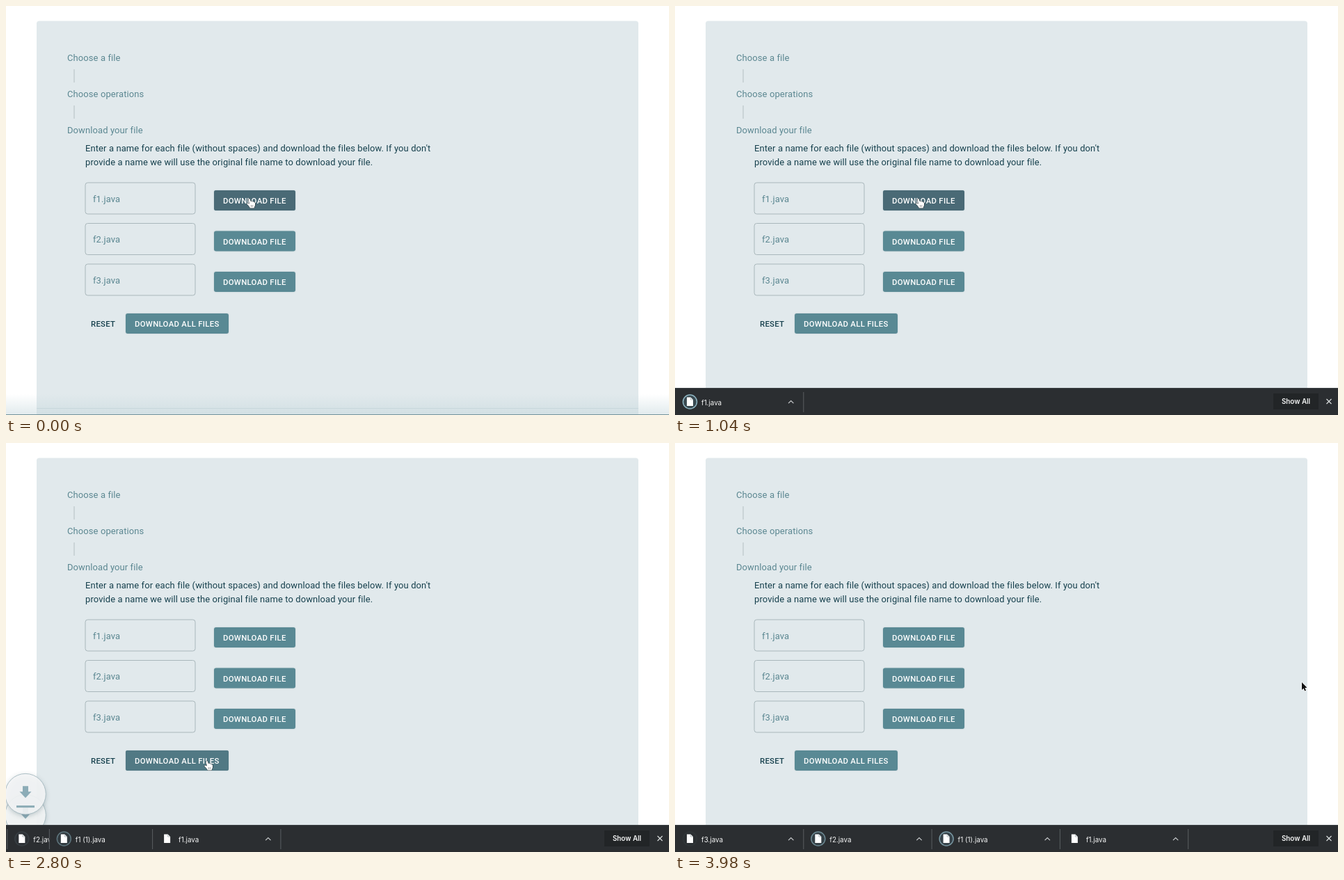
An HTML page with a canvas for the animation above (4000 ms loop, 953 by 588 pixels).

```html
<!DOCTYPE html>
<html lang="en">
<head>
<meta charset="utf-8">
<title>Download files</title>
<style>
  html, body { margin: 0; width: 100%; height: 100%; overflow: hidden; background: #fff; }
  canvas { display: block; }
</style>
</head>
<body>
<canvas id="stage" width="953" height="588"></canvas>
<script>
const W = 953, H = 588, LOOP = 4000, BAR = 39;
const c = document.getElementById('stage').getContext('2d');
const TEAL = '#598994', DARK = '#4a6a76', INK = '#16404d', LABEL = '#5b8791';

const buttons = [
  { x: 299, y: 265, w: 117, text: 'DOWNLOAD FILE' },
  { x: 299, y: 323.5, w: 117, text: 'DOWNLOAD FILE' },
  { x: 299, y: 382, w: 117, text: 'DOWNLOAD FILE' },
  { x: 172, y: 442, w: 148, text: 'DOWNLOAD ALL FILES' }
];
const ripples = [
  { button: 0, start: 20, x: 352, y: 280, r: 68 },
  { button: 3, start: 2190, x: 292, y: 458, r: 124 }
];
const bubbles = [100, 2400, 2600];
// Newest download first; peak is when its ring is brightest.
const items = [
  { name: 'f3.java', start: 2780, peak: 3120 },
  { name: 'f2.java', start: 2640, peak: 3580 },
  { name: 'f1 (1).java', start: 2500, peak: 2300 },
  { name: 'f1.java', start: 340, peak: 1360, end: 2360 }
];

const clamp = v => Math.max(0, Math.min(1, v));
const part = (t, from, length) => clamp((t - from) / length);
const smooth = p => p * p * (3 - 2 * p);
const mix = (a, b, p) => a + (b - a) * p;

function box(x, y, w, h, r) {
  c.beginPath();
  c.roundRect(x, y, w, h, r);
}

function path(points, close) {
  c.beginPath();
  points.forEach(([x, y]) => c.lineTo(x, y));
  if (close) c.closePath();
}

function line(points, color, width = 1) {
  path(points);
  c.strokeStyle = color;
  c.lineWidth = width;
  c.stroke();
}

function text(s, x, y, color, font = '12.95px Roboto, sans-serif', spacing = 0.12) {
  c.font = font;
  c.letterSpacing = spacing + 'px';
  c.fillStyle = color;
  c.fillText(s, x, y);
}

const caps = (s, x, y, color) => text(s, x, y, color, '500 11.34px Roboto, sans-serif', 0.32);
const small = (s, x, y, weight = 400) => text(s, x, y, '#f4f5f5', weight + ' 9.8px Inter, sans-serif', 0);

function pointer(t) {
  const a = smooth(part(t, 1130, 430)), b = smooth(part(t, 3330, 430));
  return {
    x: mix(mix(350, 289, a), 901, b),
    y: mix(mix(277, 457, a), 344, b)
  };
}

const inside = (p, b) => p.x >= b.x && p.x <= b.x + b.w && p.y >= b.y && p.y <= b.y + 29;

// Averages the recent past, which gives the hover colour its fade.
function hover(b, t) {
  let sum = 0;
  for (let i = 0; i < 10; i++) sum += inside(pointer(t - i * 20), b);
  return sum / 10;
}

function drawButton(b, i, t) {
  c.save();
  c.shadowColor = 'rgba(40,80,90,.25)';
  c.shadowBlur = 2;
  box(b.x, b.y, b.w, 29, 3);
  c.fillStyle = TEAL;
  c.fill();
  c.restore();

  c.save();
  c.clip();
  c.globalAlpha = hover(b, t);
  c.fillStyle = DARK;
  c.fillRect(b.x, b.y, b.w, 29);
  for (const r of ripples) {
    const age = t - r.start;
    if (r.button !== i || age < 0 || age > 850) continue;
    c.globalAlpha = 0.92 * (1 - part(age, 400, 450));
    c.fillStyle = TEAL;
    c.beginPath();
    c.arc(r.x, r.y, r.r * smooth(part(age, 0, 510)), 0, 7);
    c.fill();
  }
  c.restore();
  caps(b.text, b.x + 13, b.y + 19, '#fff');
}

function drawPage(t) {
  c.fillStyle = '#fff';
  c.fillRect(0, 0, W, H);
  box(44, 21.5, 865, 600, 4);
  c.fillStyle = '#e1e9ec';
  c.fill();

  ['Choose a file', 'Choose operations', 'Download your file']
    .forEach((s, i) => text(s, 88, 79 + i * 52, LABEL));
  line([[98, 91], [98, 110]], '#b4bfc2');
  line([[98, 143], [98, 162]], '#b4bfc2');
  text("Enter a name for each file (without spaces) and download the files below. If you don't", 114, 209, INK);
  text('provide a name we will use the original file name to download your file.', 114, 228.5, INK);

  for (let i = 0; i < 3; i++) {
    const y = 254 + i * 58.5;
    box(114, y, 158, 45, 3.5);
    c.strokeStyle = '#a9b7bb';
    c.lineWidth = 1;
    c.stroke();
    text(`f${i + 1}.java`, 125, y + 27.5, LABEL);
  }
  buttons.forEach((b, i) => drawButton(b, i, t));
  caps('RESET', 122, 461, INK);
}

function drawPageEnd() {
  const g = c.createLinearGradient(0, 558, 0, H);
  g.addColorStop(0, 'rgba(195,214,219,0)');
  g.addColorStop(1, 'rgba(195,214,219,.5)');
  c.fillStyle = g;
  c.fillRect(0, 558, W, 30);
  line([[44, 578.5], [909, 578.5]], 'rgba(150,180,188,.25)');
  c.fillStyle = '#74949c';
  c.fillRect(0, 587, W, 1);
}

function drawBubble(start, t) {
  const s = (t - start) / 600;
  if (s <= 0 || s >= 1) return;
  c.save();
  c.globalAlpha = 1 - 4 * (s - 0.5) ** 2;
  c.translate(28, 513.5 + (s - 0.433) * 90);
  c.beginPath();
  c.arc(0, 0, 29.3, 0, 7);
  c.save();
  c.shadowColor = 'rgba(60,90,100,.35)';
  c.shadowBlur = 7;
  c.shadowOffsetY = 2;
  c.fillStyle = '#f5f7f8';
  c.fill();
  c.restore();
  c.strokeStyle = '#a5b9bf';
  c.lineWidth = 1;
  c.stroke();
  c.fillStyle = '#7fa3af';
  path([[-4, -11.5], [4, -11.5], [4, -3.5], [8.5, -3.5], [0, 5.5], [-8.5, -3.5], [-4, -3.5]], true);
  c.fill();
  c.fillRect(-13, 16.5, 26, 3);
  c.restore();
}

function drawItem(item, x, width, t) {
  c.save();
  c.beginPath();
  c.rect(x, 540, width, 60);
  c.clip();
  c.translate(x, 0);

  const wave = 0.5 + 0.5 * Math.cos((t - item.peak) * Math.PI / 1000);
  const early = item.end && t < item.peak;
  c.globalAlpha = t > item.end ? 0 : early ? 1 : wave;
  c.beginPath();
  c.arc(21.5, 569, 10, 0, 7);
  c.fillStyle = 'rgba(100,150,170,.25)';
  c.fill();
  c.strokeStyle = '#8db4c1';
  c.lineWidth = 1.5;
  c.stroke();
  c.globalAlpha = 1;

  path([[17, 562.5], [22.5, 562.5], [26, 566], [26, 575], [17, 575]], true);
  c.fillStyle = '#fff';
  c.fill();
  line([[22.5, 562.5], [22.5, 566], [26, 566]], '#9aa5aa', 0.7);
  small(item.name, 38, 574.3);
  line([[163, 571.2], [166.7, 567.5], [170.4, 571.2]], '#c7cacc', 1.2);
  c.restore();
  line([[x + width + 0.5, 555], [x + width + 0.5, 584]], '#5a5f62');
}

function drawBar(t) {
  const h = BAR * part(t, 200, 390);
  if (h <= 0) return drawPageEnd();
  c.save();
  c.beginPath();
  c.rect(0, H - h, W, h);
  c.clip();
  c.fillStyle = '#2b2e31';
  c.fillRect(0, H - h, W, h);
  c.fillStyle = '#3c4144';
  c.fillRect(0, H - h, W, 1);
  c.translate(0, (BAR - h) * 0.6);

  let x = 0;
  for (const item of items) {
    const width = 184.3 * smooth(part(t, item.start, 420));
    if (width > 0) drawItem(item, x, width, t);
    x += width;
  }
  c.fillStyle = '#222527';
  c.fillRect(860, 557, 65, 23);
  small('Show All', 872, 572, 600);
  line([[936.5, 565], [943.5, 572]], '#d5d8d9', 1.3);
  line([[943.5, 565], [936.5, 572]], '#d5d8d9', 1.3);
  c.restore();
}

function drawPointer(t) {
  const p = pointer(t);
  const hand = buttons.some(b => inside(p, b));
  c.save();
  c.translate(p.x, p.y);
  c.lineJoin = 'round';
  if (hand) {
    path([[-1.5, 0.5], [0.5, 0], [1.8, 4], [3.5, 3.5], [4.5, 4.5], [6, 4.2], [7, 5.5], [8, 5.8],
      [8, 9.5], [6.5, 13.5], [1, 13.5], [-1, 10.5], [-3.8, 7.5], [-3, 6.2], [-0.2, 7.5]], true);
    c.fillStyle = '#fff';
    c.strokeStyle = '#1d2629';
  } else {
    path([[0, 0], [0, 11], [2.5, 8.7], [4.2, 12.5], [6, 11.7], [4.4, 8], [7.5, 7.7]], true);
    c.fillStyle = '#111';
    c.strokeStyle = '#fff';
  }
  c.lineWidth = hand ? 1 : 1.4;
  c.stroke();
  c.fill();
  if (hand) {
    line([[2.5, 9], [2.5, 12]], '#555', 0.6);
    line([[4.7, 9], [4.7, 12]], '#555', 0.6);
  }
  c.restore();
}

const begin = performance.now();
function frame() {
  const t = (performance.now() - begin) % LOOP;
  drawPage(t);
  bubbles.forEach(start => drawBubble(start, t));
  drawBar(t);
  drawPointer(t);
  requestAnimationFrame(frame);
}
frame();
</script>
</body>
</html>
```
